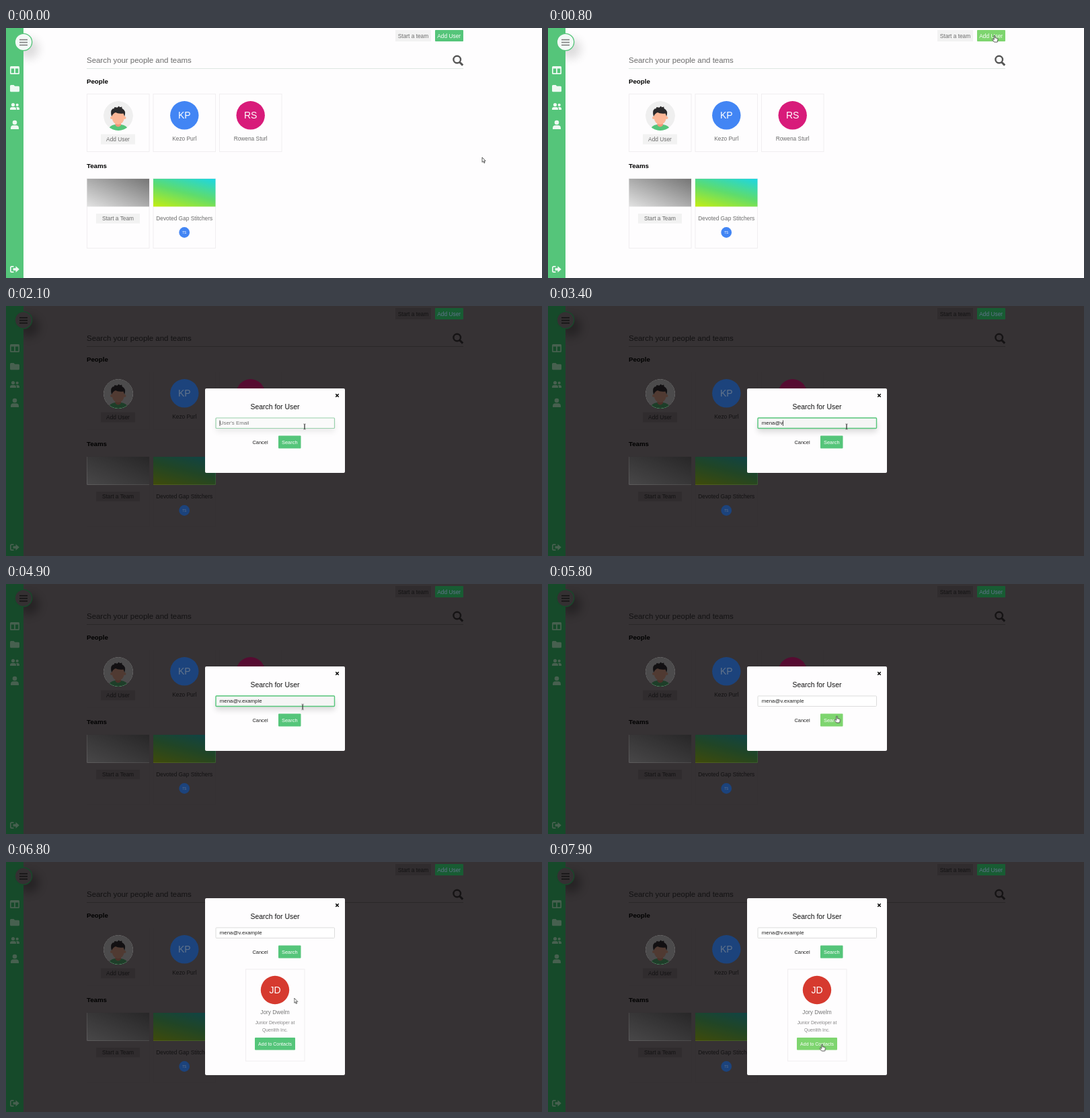
An HTML page for the animation above (8 s loop, 797 by 373 pixels).

```html
<!DOCTYPE html>
<html lang="en">
<head>
<meta charset="utf-8">
<title>People and teams</title>
<style>
html, body { margin: 0; width: 100%; height: 100%; overflow: hidden; background: #fefdfe; }
svg { display: block; width: 797px; height: 373px; }
text { font: 8.35px "Liberation Sans", Arial, sans-serif; text-anchor: middle; fill: var(--txt); }
.left { text-anchor: start; }
.search { font-size: 11.45px; }
.head { font-size: 9.7px; font-weight: bold; fill: var(--head); }
.ini { font-size: 14px; fill: var(--on); }
.tiny { font-size: 4.8px; fill: var(--on); }
.on { fill: var(--on); }

/* 8 s loop: 1.25% is 100 ms */
.page, .modal, .modal *, .cursor, .cursor g, .add { animation: 8s step-end infinite; }
.page { animation-name: palette; }
@keyframes palette {
  0% {
    --bg: #fefdfe; --side: #55c57a; --icon: #eef9f2; --txt: #6c6c6c; --head: #000;
    --btn: #f2f2f2; --line: #dde7e1; --edge: #f0eef0; --card: #fefdfe; --blue: #4285f4;
    --pink: #d81b7a; --on: #fff; --menu: #f3f9f6; --bars: #777; --glass: #555;
    --shade: transparent; --glow: .13;
  }
  12.5%, 100% {
    --bg: #363234; --side: #164a2a; --icon: #47604f; --txt: #131213; --head: #000;
    --btn: #302c2e; --line: #2a2728; --edge: #353133; --card: #363234; --blue: #1c437c;
    --pink: #560b31; --on: #62748c; --menu: #343032; --bars: #121112; --glass: #151314;
    --shade: rgba(8, 6, 8, .7); --glow: .3;
  }
}
.add { animation-name: add; animation-timing-function: linear; }
@keyframes add {
  0%, 8% { fill: #55c57a; }
  10%, 12.49% { fill: #7ed56f; }
  12.5%, 100% { fill: #185c33; }
}

.modal { animation-name: open; }
@keyframes open { 0% { visibility: hidden; } 12.5%, 100% { visibility: visible; } }
.modal text { fill: #222; }
.modal .title { font-size: 10.4px; fill: #111; }
.modal .small { font-size: 7.45px; }
.modal .field { font-size: 7.85px; }
.modal .hint { fill: #757575; }
.modal .soft { fill: #777; }
.modal .job { font-size: 6.75px; fill: #888; }
.modal .white { fill: #fff; }
.modal .body { animation-name: rise; }
@keyframes rise { 0% { transform: translateY(69px); } 73.75%, 100% { transform: none; } }
.modal .sheet { animation-name: grow; }
@keyframes grow { 0% { height: 126px; } 73.75%, 100% { height: 264px; } }
.modal .result { animation-name: found; }
@keyframes found { 0% { visibility: hidden; } 73.75%, 100% { visibility: visible; } }
.modal .input { animation-name: focus; animation-timing-function: linear; }
@keyframes focus {
  0%, 25%, 70%, 100% { fill: #fff; stroke: #dcdcdc; stroke-width: 1px; }
  27.5%, 68.75% { fill: #f5f5f5; stroke: #55c57a; stroke-width: 1.4px; }
}
.modal .lift { filter: blur(4px); animation-name: lift; animation-timing-function: linear; }
@keyframes lift { 0%, 25%, 70%, 100% { opacity: 0; } 27.5%, 68.75% { opacity: .14; } }
.modal .find { animation-name: find; animation-timing-function: linear; }
@keyframes find {
  0%, 66.25%, 76.25%, 100% { fill: #55c57a; }
  68.75%, 73.75% { fill: #7ed56f; }
}
.modal .save { animation-name: save; animation-timing-function: linear; }
@keyframes save { 0%, 92.5% { fill: #55c57a; } 95%, 100% { fill: #7ed56f; } }

.cursor { animation-name: move; }
@keyframes move {
  0% { transform: translate(708px, 193px); }
  1.25% { transform: translate(708px, 193px); animation-timing-function: steps(2); }
  3.75% { transform: translate(705px, 172px); animation-timing-function: steps(3); }
  7.5% { transform: translate(673px, 38px); animation-timing-function: steps(2); }
  10% { transform: translate(664px, 11px); }
  12.5% { transform: translate(664px, 11px); animation-timing-function: steps(3); }
  16.25% { transform: translate(635px, 42px); animation-timing-function: steps(3); }
  20% { transform: translate(480px, 165px); animation-timing-function: steps(3); }
  23.75% { transform: translate(444px, 180px); }
  60% { transform: translate(444px, 180px); animation-timing-function: steps(5); }
  66.25% { transform: translate(429.5px, 197px); }
  83.75% { transform: translate(429px, 197px); }
  85% { transform: translate(428.5px, 203px); animation-timing-function: steps(6); }
  92.5% { transform: translate(410px, 262px); animation-timing-function: steps(2); }
  95%, 100% { transform: translate(407.5px, 272px); }
}
.cursor .arrow { animation-name: arrow; }
@keyframes arrow {
  0%, 12.5%, 73.75% { visibility: visible; }
  8.75%, 22.5%, 92.5%, 100% { visibility: hidden; }
}
.cursor .hand { animation-name: hand; }
@keyframes hand {
  0%, 13.75%, 73.75% { visibility: hidden; }
  8.75%, 65%, 92.5%, 100% { visibility: visible; }
}
.cursor .beam { animation-name: beam; }
@keyframes beam { 0%, 65%, 100% { visibility: hidden; } 22.5% { visibility: visible; } }
</style>
</head>
<body>
<svg viewBox="0 0 797 373">
  <defs>
    <linearGradient id="gray" x1="0" y1="1" x2="1" y2="0">
      <stop stop-color="#e2e2e2"/><stop offset="1" stop-color="#757575"/>
    </linearGradient>
    <linearGradient id="lime" x1=".15" y1="1.1" x2=".85" y2="-.1">
      <stop stop-color="#c6ee10"/><stop offset=".5" stop-color="#5fdc6c"/><stop offset="1" stop-color="#1bd6e6"/>
    </linearGradient>
    <clipPath id="face"><circle cx="167" cy="131" r="22"/></clipPath>
  </defs>

  <g class="page">
    <rect width="797" height="373" fill="var(--bg)"/>
    <circle cx="34" cy="31" r="15" style="filter:blur(7px);opacity:var(--glow)"/>
    <rect width="26" height="373" fill="var(--side)"/>
    <circle cx="26" cy="21" r="12.7" fill="var(--menu)" stroke="var(--side)" stroke-width="1.3"/>
    <path d="M20 17.5h12M20 21.5h12M20 25.5h12" stroke="var(--bars)" stroke-width="1.3"/>
    <g fill="var(--icon)">
      <path fill-rule="evenodd" d="M7.500 57h11q1.500 0 1.500 1.500v9q0 1.500-1.500 1.500h-11q-1.500 0-1.500-1.500v-9q0-1.500 1.500-1.500zM7.700 60.500v6.800h4.400v-6.800zM13.900 60.500v6.800h4.400v-6.800z"/>
      <path d="M7.500 85h4l1.700 1.700h5.300q1.500 0 1.500 1.500v5.600q0 1.500-1.500 1.500h-11q-1.500 0-1.500-1.500v-7.300q0-1.500 1.500-1.500z"/>
      <circle cx="10.500" cy="114.500" r="2.600"/><circle cx="16.700" cy="114.800" r="2.100"/>
      <path d="M6 122v-1.200q0-2.800 3-2.800h3q3 0 3 2.800v1.200zM16 122v-1.500q0-1.600-1-2.500h2.500q2.500 0 2.500 2.600v1.400z"/>
      <circle cx="13" cy="141" r="3.300"/>
      <path d="M7 151v-1.700q0-4 4-4h4q4 0 4 4v1.700z"/>
      <path d="M11.500 355h-3q-2.500 0-2.500 2.500v5q0 2.500 2.500 2.500h3v-1.800h-3q-.8 0-.8-.8v-4.800q0-.8.800-.8h3zM10.500 358.300h4v-3.100l5.300 4.800-5.300 4.800v-3.100h-4z"/>
    </g>

    <rect x="579" y="3" width="53" height="17" fill="var(--btn)"/>
    <text x="605.500" y="14.500">Start a team</text>
    <rect class="add" x="638" y="3" width="42" height="17" rx="1"/>
    <text class="on" x="658.700" y="14.500">Add User</text>

    <text class="left search" x="120" y="51.500">Search your people and teams</text>
    <path d="M120 60.500h560" stroke="var(--line)"/>
    <g fill="none" stroke="var(--glass)" stroke-width="2.400">
      <circle cx="670.700" cy="47" r="5.300"/><path d="M674.600 51l4.600 4.600" stroke-width="3"/>
    </g>

    <text class="left head" x="120" y="83">People</text>
    <g fill="var(--card)" stroke="var(--edge)">
      <rect x="120.500" y="98.500" width="92.500" height="86"/>
      <rect x="219" y="98.500" width="92.500" height="86"/>
      <rect x="317.500" y="98.500" width="92.500" height="86"/>
      <rect x="120.500" y="224.500" width="92.500" height="104"/>
      <rect x="219" y="224.500" width="92.500" height="104"/>
    </g>
    <g clip-path="url(#face)">
      <circle cx="167" cy="131" r="22" fill="#efefef"/>
      <path d="M152 156q0-11 10-12h9q11 1 11 12z" fill="#55c57a"/>
      <path d="M162.500 140h8.500v5q-4.200 5-8.500 0z" fill="#f0977a"/>
      <path d="M157.500 125h18.500v8q-1 10.500-9.300 11-8.200-.5-9.200-11z" fill="#fdb797"/>
      <circle cx="157" cy="134" r="2" fill="#fdb797"/><circle cx="176.500" cy="134" r="2" fill="#fdb797"/>
      <path d="M157 132q-2.500-8 1.500-11.500l2-.3 1-2.200 4 .8 2.300-2.300 1.500 1.700 3-.7.300 2.500q6.500 3 3.700 12l-1.800-4.500q-8 .8-11.500-1.500-3.500 1-6 6z" fill="#2b2a2c"/>
      <circle cx="167" cy="131" r="22" fill="var(--shade)"/>
    </g>
    <rect x="141" y="158.500" width="51" height="15" fill="var(--btn)"/>
    <text x="166.500" y="169">Add User</text>
    <circle cx="265.300" cy="130.300" r="21.200" fill="var(--blue)"/>
    <text class="ini" x="265.300" y="135.200">KP</text>
    <text x="265.300" y="168">Kezo Purl</text>
    <circle cx="363.700" cy="130.300" r="21.200" fill="var(--pink)"/>
    <text class="ini" x="363.700" y="135.200">RS</text>
    <text x="363.700" y="168">Rowena Sturl</text>

    <text class="left head" x="120" y="209">Teams</text>
    <rect x="120.500" y="225" width="92.500" height="41.500" fill="url(#gray)"/>
    <rect x="219" y="225" width="92.500" height="41.500" fill="url(#lime)"/>
    <path d="M120.500 225h92.500v41.500h-92.500zM219 225h92.500v41.500h-92.500z" fill="var(--shade)"/>
    <rect x="134" y="277" width="65" height="14.500" fill="var(--btn)"/>
    <text x="166.500" y="287">Start a Team</text>
    <text x="265.200" y="287">Devoted Gap Stitchers</text>
    <circle cx="265.200" cy="305" r="7.900" fill="var(--blue)"/>
    <text class="tiny" x="265.200" y="306.700">TS</text>
  </g>

  <g class="modal">
    <g class="body">
      <rect class="sheet" x="296" y="54" width="208" height="264" rx="2" fill="#fefdfe"/>
      <path d="M490.300 62.300l4.400 4.400m0-4.400l-4.400 4.400" stroke="#000" stroke-width="1.500"/>
      <text class="title" x="400" y="84.800">Search for User</text>
      <rect class="lift" x="312" y="104" width="177" height="15"/>
      <rect class="input" x="312" y="98" width="176.500" height="15.500" rx="1"/>
      <text class="left field" id="email" x="317.800" y="108.300"></text>
      <path id="caret" d="M0 101.500v8.500" stroke="#111" stroke-width=".7"/>
      <text class="small" x="378" y="136.700">Cancel</text>
      <rect class="find" x="405" y="124.500" width="33.500" height="19" rx="1"/>
      <text class="small white" x="421.800" y="136.700">Search</text>
    </g>
    <g class="result">
      <rect x="356.500" y="160" width="87.500" height="137" fill="#fefdfe" stroke="#f0eef0"/>
      <circle cx="400" cy="191" r="21.200" fill="#d63a2f"/>
      <text class="ini white" x="400" y="196">JD</text>
      <text class="soft" x="400" y="227">Jory Dwelm</text>
      <text class="job" x="400" y="242.300">Junior Developer at</text>
      <text class="job" x="400" y="253.300">Quenlith Inc.</text>
      <rect class="save" x="370" y="262" width="60" height="18.500" rx="1"/>
      <text class="white" x="400" y="273.800" style="font-size:7px">Add to Contacts</text>
    </g>
  </g>

  <g class="cursor" fill="#fff" stroke="#333" stroke-width=".8" stroke-linejoin="round">
    <g class="arrow"><path d="M0 0v7.300l1.700-1.500 1.200 2.700 1.200-.5-1.200-2.700h2.200z"/></g>
    <g class="hand"><path d="M-.8.500q.8-1 1.600 0v3.200l3.200.7q1 .3 1 1.300l-.8 4.300h-4.700l-2.800-3.600q-.2-1.200 1-1l1.500 1.100z"/></g>
    <g class="beam"><path d="M-1.500-4q1.500 0 1.500.8v6.400q0 .8-1.500.8m3-8q-1.500 0-1.500.8v6.400q0 .8 1.500.8" fill="none"/></g>
  </g>
</svg>
<script>
const LOOP = 8000, EMAIL = "mena@v.example", HINT = "User's Email";
const KEYS = [2500, 2600, 2700, 2800, 3100, 3400, 3500, 3700, 3900, 4000, 4100, 4200, 4300, 4400];
const FOCUS = 2000, BLUR = 5500;
const email = document.getElementById("email");
const caret = document.getElementById("caret");
let start;

function draw(now) {
  start ??= now;
  const t = (now - start) % LOOP;
  const count = KEYS.filter(k => k <= t).length;
  const label = count ? EMAIL.slice(0, count) : HINT;
  if (email.textContent !== label) {
    email.textContent = label;
    email.classList.toggle("hint", !count);
    const x = 318 + (count ? email.getComputedTextLength() : 0);
    caret.setAttribute("transform", `translate(${x})`);
  }
  const since = t - (count ? KEYS[count - 1] : FOCUS);
  const lit = t >= FOCUS && t < BLUR && since % 1000 < 500;
  caret.setAttribute("opacity", lit ? 1 : 0);
  requestAnimationFrame(draw);
}
requestAnimationFrame(draw);
</script>
</body>
</html>
```
